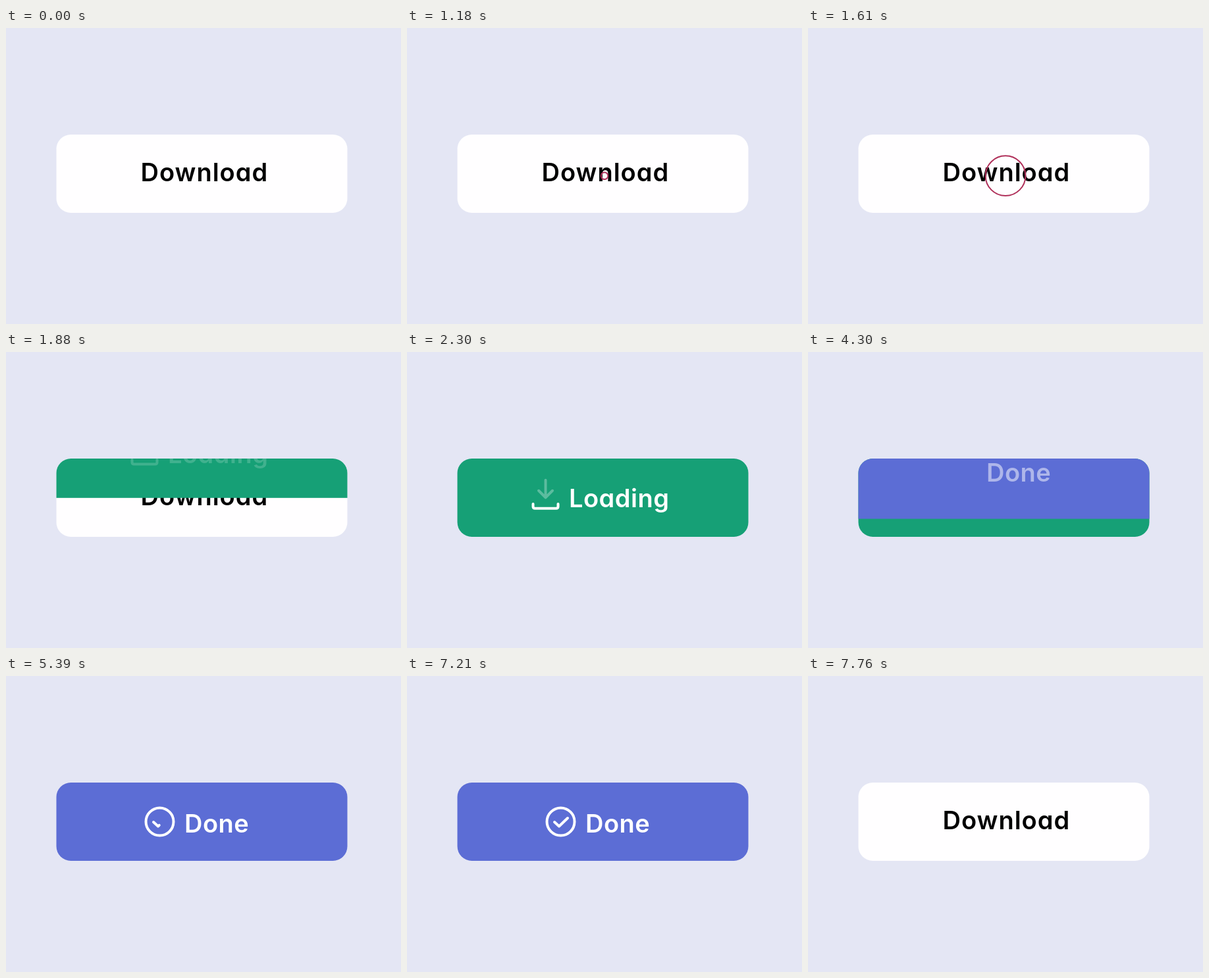
Recreate the animation shown at these times as an HTML page. Size 600 px wide and 450 px high, loop 7.79 s.

```html
<!DOCTYPE html>
<html lang="en">
<head>
<meta charset="utf-8">
<title>Download button</title>
<style>
  html, body { margin: 0; width: 100%; height: 100%; overflow: hidden; background: #e4e6f4; }
  svg { display: block; width: 600px; height: 450px; }
  text { font: 600 38px Inter, sans-serif; font-feature-settings: "cv11"; letter-spacing: .5px; }
  .icon { fill: none; stroke: #fff; stroke-width: 4; stroke-linecap: round; stroke-linejoin: round; }
  .light { fill: #fff; }
</style>
</head>
<body>
<svg viewBox="0 0 600 450">
  <defs>
    <clipPath id="button"><rect x="76.5" y="162" width="442" height="119" rx="22"/></clipPath>
    <clipPath id="line"><rect x="180" y="180" width="240" height="64.5"/></clipPath>
    <rect id="face" x="76" y="162" width="443" height="119"/>
    <text id="label" x="204.5" y="233" style="letter-spacing: 1px">Download</text>
  </defs>
  <g clip-path="url(#button)">
    <g id="idle">
      <use class="panel" href="#face" fill="#fffeff"/>
      <g class="content"><use href="#label"/></g>
    </g>

    <g id="loading">
      <use class="panel" href="#face" fill="#16a076"/>
      <rect id="bar" x="76" y="273.5" height="8" fill="#34f5b4"/>
      <g class="content">
        <path id="arrow" class="icon" d="M210.5 193v26M200 209l10.5 10.5L221 209"/>
        <path class="icon" d="M191.5 231v4q0 2.8 2.8 2.8h32.4q2.8 0 2.8-2.8v-4"/>
        <text class="light" x="246" y="236" clip-path="url(#line)">Loading</text>
      </g>
    </g>

    <g id="done">
      <use class="panel" href="#face" fill="#5c6dd5"/>
      <g class="content"><text class="light" x="271" y="238">Done</text></g>
      <circle id="ring" class="icon" cx="233.5" cy="221.5" r="21" pathLength="1" transform="rotate(-90 233.5 221.5)"/>
      <path id="check" class="icon" d="M224 222l7 6.500 13-12.500" pathLength="1"/>
    </g>

    <g id="reset">
      <use class="panel" href="#face" fill="#fffeff"/>
      <g class="content"><use href="#label"/></g>
    </g>
  </g>
  <circle id="tap" cx="300" cy="224.700" fill="none" stroke="#b0305a" stroke-width="2"/>
</svg>
<script>
  const LOOP = 7790, DROP = 390;
  const $ = id => document.getElementById(id);
  const progress = (t, start, length) => Math.min(1, Math.max(0, (t - start) / length));
  const easeOut = p => 1 - (1 - p) ** 3;

  // A panel drops in from the top; its content follows while fading in.
  // It stays until the next panel has covered it.
  function drop(id, t, start, next) {
    const panel = easeOut(progress(t, start, DROP));
    const content = easeOut(progress(t, start + 50, 485));
    const group = $(id);
    group.style.display = t < start || t >= next + DROP ? "none" : "";
    group.querySelector(".panel").setAttribute("transform", `translate(0 ${-119 * (1 - panel)})`);
    const inner = group.querySelector(".content");
    inner.setAttribute("transform", `translate(0 ${-82 * (1 - content)})`);
    inner.setAttribute("opacity", content);
  }

  function trace(id, p) {
    const style = $(id).style;
    style.display = p > 0 ? "" : "none";
    style.strokeDasharray = p < 1 ? `${p} 2` : "none";
  }

  function draw(t) {
    const tap = $("tap");
    tap.setAttribute("r", 30.3 * Math.max(0, t - 1090) / 520);
    tap.setAttribute("opacity", t > 1090 ? 1 - progress(t, 1700, 150) : 0);

    drop("idle", t, -LOOP, 1800);
    drop("loading", t, 1800, 4150);
    drop("done", t, 4150, 7260);
    drop("reset", t, 7260, LOOP);

    const fall = Math.max(0, t - 1912) / 1292 % 1;
    $("arrow").setAttribute("transform", `translate(0 ${6 * fall})`);
    $("arrow").setAttribute("opacity", fall);

    const loaded = progress(t, 2640, 1560) ** 2.7;
    $("bar").setAttribute("width", t < 4200 ? 442 * loaded : 0);

    trace("ring", progress(t, 4600, 600));
    trace("check", progress(t, 5200, 440));
  }

  const begin = performance.now();
  function frame() {
    draw((performance.now() - begin) % LOOP);
    requestAnimationFrame(frame);
  }
  frame();
</script>
</body>
</html>
```
